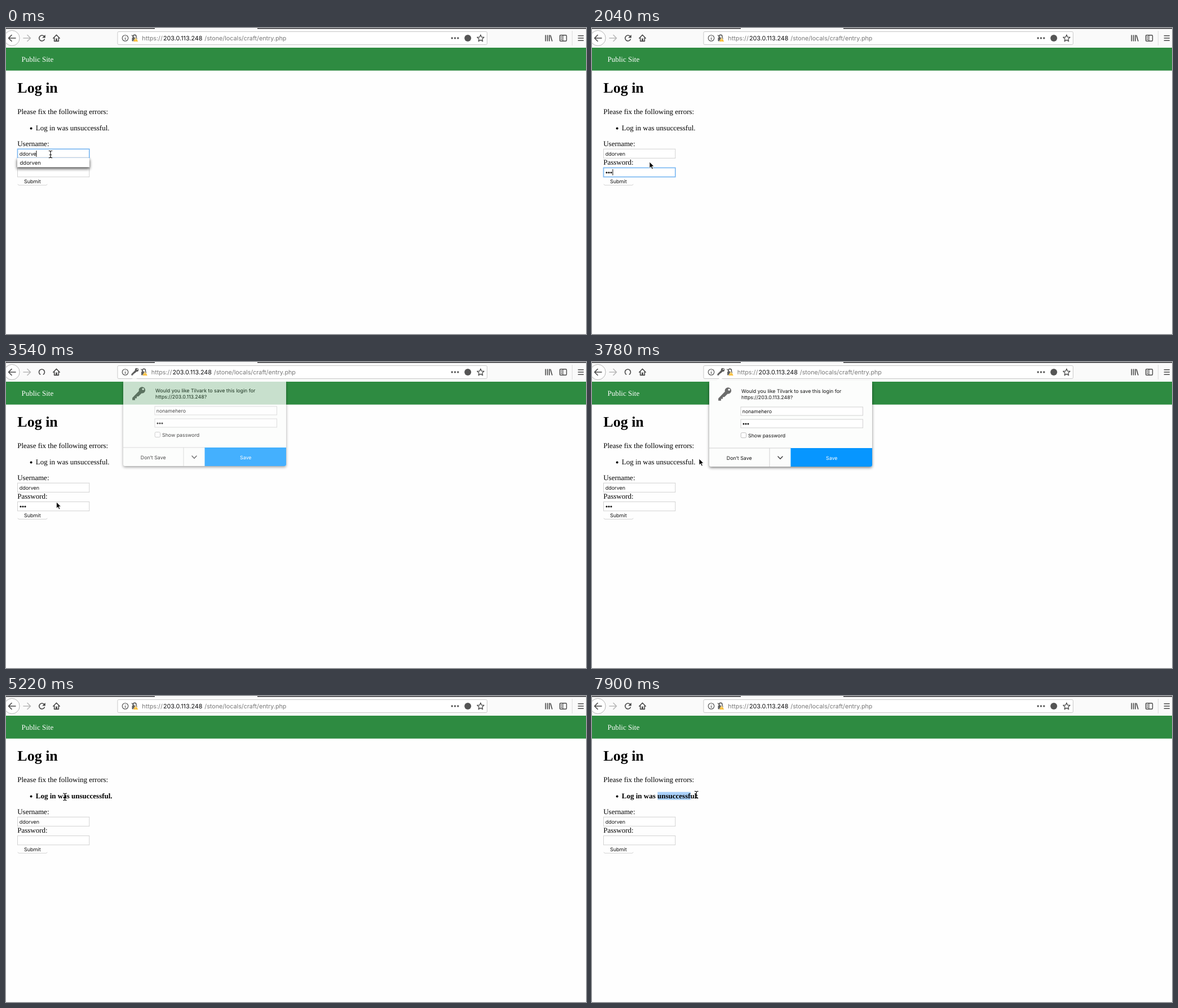
Animation of 1029x544 px, one loop 8 s. Source, as an HTML page:

```html
<!DOCTYPE html>
<html lang="en">
<head>
<meta charset="utf-8">
<title>Log in</title>
<style>
html, body { margin: 0; width: 100%; height: 100%; overflow: hidden; background: #fefefe; }
svg { display: block; width: 1029px; height: 544px; }
text { white-space: pre; text-rendering: geometricPrecision; }
.ui { font-family: Inter, "Liberation Sans", sans-serif; font-size: 9px; fill: #111; }
.pop { font-size: 8.8px; }
.url { font-size: 10.75px; fill: #777; }
.page { font-family: "Liberation Serif", "Noto Serif", serif; font-size: 13px; fill: #000; }
.line { fill: none; stroke: #484848; stroke-width: 1.6; stroke-linecap: round; stroke-linejoin: round; }
.field { fill: #fff; stroke: #d2d2d2; }
</style>
</head>
<body>
<svg viewBox="0 0 1029 544">
  <defs>
    <filter id="blur" x="-20%" y="-60%" width="140%" height="220%"><feGaussianBlur stdDeviation="2.4"/></filter>
    <g id="key">
      <circle cx="4" cy="-4" r="3.2"/>
      <path d="M1.2 -3.4L-5.6 3.6V5.8H-2.9V4H-1.2V2.2H.4L3.6 -1Z"/>
      <circle cx="5" cy="-5" r="1" fill="#fff"/>
    </g>
  </defs>

  <!-- browser toolbar -->
  <rect width="1029" height="35" fill="#fafafa"/>
  <path d="M0 0H264V1.6H0ZM446 0H1029V1.6H446Z" fill="#303034"/>
  <rect id="tabLoad" x="264" width="126" height="1.5" fill="#79bdf5"/>
  <circle cx="10.5" cy="18" r="13.6" fill="#fff" stroke="#b5b5b5"/>
  <path class="line" d="M17 18H4.5M10 12.5L4.5 18L10 23.5"/>
  <path class="line" style="stroke:#b8b8b8" d="M31 18H43.5M38 12.5L43.5 18L38 23.5"/>
  <g id="reload">
    <path class="line" d="M68.3 20.2A5 5 0 1 1 67.3 14.4"/>
    <path d="M69.8 12V17.6H64.2Z" fill="#484848"/>
  </g>
  <path id="spin" class="line" d="M60.6 22A5 5 0 1 1 66.4 22"/>
  <path id="stop" class="line" style="stroke:#b8b8b8;stroke-width:1.3" d="M58.5 13L68.5 23M68.5 13L58.5 23"/>
  <path class="line" d="M83.8 18.2L89.5 12.3L95.2 18.2M85.7 17.5V23.4H93.3V17.5"/>
  <rect x="88.2" y="18.6" width="2.6" height="5" fill="#484848"/>
  <rect x="198" y="6.5" width="655.5" height="23" rx="2" fill="#fff" stroke="#c8c8c8"/>
  <g class="line" style="stroke-width:1.1">
    <circle cx="211.5" cy="18" r="5.3"/>
    <path d="M211.5 17.5V20.8M211.5 15.2V15.3"/>
  </g>
  <use id="barKey" href="#key" x="228" y="18" fill="#5d5d5d"/>
  <g id="address">
    <path class="line" style="stroke-width:1.4" d="M225.5 17V15A2.7 2.7 0 0 1 231 15V17"/>
    <rect x="223.5" y="17" width="9" height="6.5" rx="1" fill="#606060"/>
    <path d="M223 12.5L232 23" stroke="#606060" stroke-width="1.2"/>
    <path d="M230 16.7L234.7 24.2H225.5Z" fill="#f7b51d" stroke="#fff" stroke-width=".6"/>
    <path d="M230.1 19V21.4M230.1 22.3V23.2" stroke="#fff"/>
    <text class="ui url" x="241.3" y="22">https://</text>
    <text class="ui url" x="279" y="22" style="fill:#0c0c0d">203.0.113.248</text>
    <text class="ui url" x="352.3" y="22">/stone/locals/craft/entry.php</text>
  </g>
  <g fill="#555">
    <circle cx="791.3" cy="18" r="1.7"/><circle cx="796.6" cy="18" r="1.7"/><circle cx="801.9" cy="18" r="1.7"/>
    <circle cx="819.3" cy="18" r="6"/>
  </g>
  <path id="star" class="line" style="stroke-width:1.3"/>
  <path class="line" d="M957.3 13V23M960.6 13V23M963.9 13V23M966 13.2L968.8 23"/>
  <rect class="line" x="982.5" y="12.8" width="12" height="10.5" rx="1.5" style="stroke-width:1.4"/>
  <path class="line" style="stroke-width:1.2" d="M988 13V23M984.5 15.6H986M984.5 18H986M984.5 20.4H986"/>
  <path d="M1004.5 5V31" stroke="#dcdcdc"/>
  <path class="line" d="M1015.3 13.8H1024.3M1015.3 18H1024.3M1015.3 22.2H1024.3"/>

  <!-- page -->
  <rect y="35" width="1029" height="40.7" fill="#2e8b41"/>
  <g class="page">
    <text x="27.5" y="60" fill="#fff">Public Site</text>
    <text x="20.3" y="115" font-size="26" font-weight="bold">Log in</text>
    <text x="20.2" y="153">Please fix the following errors:</text>
    <circle cx="44.6" cy="178.4" r="2"/>
    <rect id="mark" x="116.3" y="170.6" height="14" fill="#a9d0fa"/>
    <text id="error" x="52.8" y="181.6">Log in was unsuccessful.</text>
    <text x="20.2" y="210.4">Username:</text>
    <text x="20.2" y="243.3">Password:</text>
  </g>
  <rect id="userBox" class="field" x="20.5" y="215.2" width="127.3" height="16.2"/>
  <rect id="passBox" class="field" x="20.5" y="248.5" width="127.3" height="16.2"/>
  <text id="user" class="ui" x="23.7" y="227"></text>
  <g id="dots"></g>
  <rect id="caret" width="1" height="11" fill="#111"/>
  <path d="M21 277.5Q21.3 279.4 23 279.4H71Q72.7 279.4 73 277.5" fill="none" stroke="#cfcfcf" stroke-width=".9"/>
  <text class="ui" x="32" y="276">Submit</text>
  <g id="list">
    <rect x="19" y="233" width="130" height="18" rx="3" fill="#000" opacity=".55" filter="url(#blur)"/>
    <rect x="20" y="231" width="128" height="16.4" fill="#fff"/>
    <text class="ui" x="24.5" y="242.8" style="font-size:9.5px">ddorven</text>
  </g>

  <!-- save prompt -->
  <g id="prompt">
    <rect x="208" y="37" width="289" height="151" rx="3" fill="#000" opacity=".5" filter="url(#blur)"/>
    <path d="M211 33H221L228 27.5L235 33H494Q497 33 497 36V183Q497 186 494 186H211Q208 186 208 183V36Q208 33 211 33Z" fill="#fcfdfc"/>
    <use href="#key" transform="translate(234.2 58.2) scale(1.8)" fill="#6c6c6c"/>
    <g class="ui pop">
      <text class="ui pop" x="265" y="55.2">Would you like Tilvark to save this login for</text>
      <text class="ui pop" x="265" y="66">https://203.0.113.248?</text>
      <rect class="field" x="264" y="80" width="216.5" height="15"/>
      <rect class="field" x="264" y="102" width="216.5" height="15"/>
      <text id="saved" class="ui pop" x="266.7" y="91"></text>
      <g fill="#111"><circle cx="269" cy="110" r="1.5"/><circle cx="273" cy="110" r="1.5"/><circle cx="277" cy="110" r="1.5"/></g>
      <rect x="264.2" y="125.7" width="9.3" height="9" rx="2" fill="#fff" stroke="#bdbdbd"/>
      <text class="ui pop" x="277" y="134">Show password</text>
    </g>
    <rect id="hover" x="208" y="153" width="144.5" height="33" fill="#e4e4e4"/>
    <path d="M208 153H353M315 153V186" fill="none" stroke="#d0d0d0"/>
    <rect id="hoverGap" x="314" y="158" width="2" height="0" fill="#ccc"/>
    <path d="M352.5 153H497V183Q497 186 494 186H352.5Z" fill="#0796ff"/>
    <path class="line" d="M330 168L334 172.2L338 168"/>
    <text class="ui pop" x="238.8" y="173.6">Don’t Save</text>
    <text class="ui pop" x="415" y="173.6" style="fill:#fff">Save</text>
  </g>

  <g id="beam" fill="none" stroke-linecap="round">
    <path d="M-2.8 -6.2Q0 -6.2 0 -4.2Q0 -6.2 2.8 -6.2M0 -4.2V4.2M-2.8 6.2Q0 6.2 0 4.2Q0 6.2 2.8 6.2M-1.6 1H1.6" stroke="#111" stroke-width="1.1"/>
  </g>
  <path id="arrow" d="M0 0V11.2L2.6 8.8L4.5 13L6.4 12.1L4.5 8H8Z" fill="#000" stroke="#fff" stroke-width=".8"/>
</svg>
<script>
const LOOP = 8000;
const $ = id => document.getElementById(id);
const show = (id, on) => $(id).style.display = on ? "" : "none";
const set = (id, attrs) => { for (const k in attrs) $(id).setAttribute(k, attrs[k]); };
const within = (t, from, to) => t >= from && t < to;
// latest entry whose time has come
const at = (list, t) => list.filter(e => e[0] <= t).pop();

// time, x, y of the pointer
const POINTER = [
  [0, 79, 224.5], [2040, 102, 238], [2190, 62, 292], [2340, 1, 314], [2480, 20, 295],
  [2630, 40, 290], [2780, 50, 286], [2930, 56, 281.5], [3070, 50, 271], [3210, 52, 269],
  [3360, 70, 258], [3540, 89.5, 249], [3780, 190, 172], [4110, 268, 168], [4410, 273, 166.5],
  [4860, 235, 172], [5040, 150, 178], [5220, 104.5, 179.3],
  [5510, 105.5, 179], [5660, 107, 178.6], [5810, 110, 178], [5960, 113, 177.5],
  [6110, 116, 177], [6260, 117.5, 176.5], [6560, 119, 176], [6710, 130, 175],
  [6855, 148, 174], [7000, 164, 174], [7150, 174, 174.5], [7450, 176, 174.5],
  [7600, 179, 174.5], [7750, 182, 175], [7900, 185.3, 175.6]
];
const PROMPT = [[0, 0], [3540, .75], [3780, 1], [4860, .5], [5040, 0]];

const starPoints = [...Array(10)].map((_, i) => {
  const r = i % 2 ? 2.9 : 6.4, a = (i * 36 - 90) * Math.PI / 180;
  return (842 + r * Math.cos(a)).toFixed(2) + " " + (18.5 + r * Math.sin(a)).toFixed(2);
});
set("star", { d: "M" + starPoints.join("L") + "Z" });

function focusBox(id, on) {
  set(id, { style: on ? "stroke:#7db9f2;stroke-width:1.7" : "" });
}

function drawForm(t) {
  const dots = t < 1590 || t >= 4410 ? 0 : t < 1740 ? 1 : t < 1890 ? 2 : 3;
  $("user").textContent = t < 150 ? "ddorve" : "ddorven";
  $("dots").innerHTML = [...Array(dots)].map((_, i) =>
    `<circle cx="${26 + i * 4}" cy="257" r="1.6" fill="#111"/>`).join("");
  focusBox("userBox", t < 840);
  focusBox("passBox", within(t, 840, 3210));
  show("list", t < 990);
  set("list", { opacity: t < 840 ? 1 : .4 });
  show("caret", t < 390 || within(t, 990, 3210));
  const inPassword = t >= 990;
  set("caret", {
    x: inPassword ? 23.5 + dots * 4.3 : t < 150 ? 53.4 : 58.6,
    y: inPassword ? 251 : 218
  });
  $("error").style.fontWeight = t < 4410 ? "normal" : "bold";
}

function drawBrowser(t) {
  const keyed = within(t, 3360, 5040);
  show("barKey", keyed);
  set("address", { transform: `translate(${keyed ? 16.5 : 0} 0)` });
  show("tabLoad", within(t, 4410, 4680));
  show("spin", within(t, 3210, 4110));
  show("stop", within(t, 4110, 4680));
  show("reload", !within(t, 3210, 4680));
}

function drawPrompt(t) {
  const opacity = at(PROMPT, t)[1];
  show("prompt", opacity > 0);
  set("prompt", { opacity, transform: `translate(0 ${opacity < 1 ? -1 : 0})` });
  $("saved").textContent = t < 4110 ? "nonamehero" : "ddorven";
  show("hover", within(t, 4110, 4860));
}

function drawPointer(t) {
  const [, x, y] = at(POINTER, t);
  const beam = t < 2040 || t >= 5220;
  show("beam", beam);
  show("arrow", !beam);
  set(beam ? "beam" : "arrow", { transform: `translate(${x} ${y})` });
  show("mark", t >= 6560);
  set("mark", { width: Math.max(0, Math.min(x, 175) - 116.3) });
}

function render(t) {
  drawForm(t);
  drawBrowser(t);
  drawPrompt(t);
  drawPointer(t);
}

const start = performance.now();
function tick() {
  render((performance.now() - start) % LOOP);
  requestAnimationFrame(tick);
}
tick();
</script>
</body>
</html>
```
